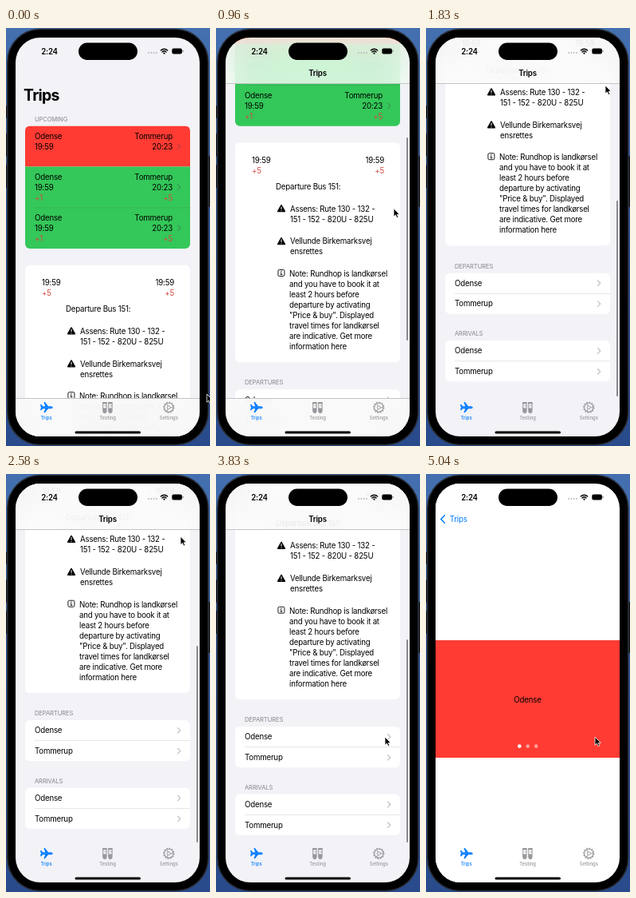
Animation, 256 px wide and 523 px high, one loop 6.73 s. Source, as an HTML page:

```html
<!DOCTYPE html>
<html lang="en">
<head>
<meta charset="utf-8">
<title>Trips</title>
<style>
html, body { margin: 0; width: 100%; height: 100%; overflow: hidden; background: linear-gradient(#4470b0, #2c529b 50%, #294b8b); }
#stage { position: relative; width: 256px; height: 523px; overflow: hidden; }
#stage div, svg { position: absolute; left: 0; top: 0; }
svg { width: 256px; height: 523px; overflow: visible; }
#screen { width: 256px; height: 523px; clip-path: inset(12px 13px 12px 12px round 31px); }
#page, #detail { width: 256px; height: 523px; background: #f2f2f7; }
#detail { background: #fff; }
#stage .bar { width: 256px; background: rgba(250, 250, 250, .82); backdrop-filter: blur(18px) saturate(1.6); box-sizing: border-box; }
#stage #navBar { top: 12px; height: 57.5px; border-bottom: .6px solid #c4c4c6; }
#stage #tabBar { top: 463px; height: 60px; border-top: .6px solid #c4c4c6; background: rgba(249, 249, 249, .93); }
#stage #thumb { left: 239px; width: 2px; border-radius: 1px; background: #8b8b8f; }
#shade { width: 256px; height: 523px; background: #000; }
text { font: 9.7px Inter, "Liberation Sans", sans-serif; letter-spacing: -.2px; white-space: pre; }
.end { text-anchor: end; }
.mid { text-anchor: middle; }
.big { font-size: 19.4px; font-weight: 700; letter-spacing: -.7px; }
.bold { font-weight: 600; }
.head { font-size: 7.6px; letter-spacing: -.12px; fill: #85858b; }
.late { fill: #d24b40; }
.tab { font-size: 5.9px; font-weight: 500; letter-spacing: 0; text-anchor: middle; fill: #97979b; }
.blue { fill: #007aff; }
</style>
</head>
<body>
<div id="stage">
  <svg id="body"></svg>
  <div id="screen">
    <div id="page">
      <svg id="list"></svg>
      <div id="thumb"></div>
      <div id="navBar" class="bar"></div>
      <div id="tabBar" class="bar"></div>
      <div id="shade"></div>
    </div>
    <div id="detail"><svg id="card"></svg></div>
    <svg id="chrome"></svg>
  </div>
  <svg id="cursor"><path d="M0 0V10.2L2.4 8.1L4 11.6L5.8 10.8L4.2 7.4H7.3Z" stroke="#fff" stroke-width=".8"/></svg>
</div>
<script>
const $ = id => document.getElementById(id);
const clamp = v => Math.min(1, Math.max(0, v));

// Drawing helpers
const text = (x, y, s, cls = '') => `<text x="${x}" y="${y}" class="${cls}">${s}</text>`;
const rect = (x, y, w, h, fill, r = 0, more = '') =>
  `<rect x="${x}" y="${y}" width="${w}" height="${h}" rx="${r}" fill="${fill}" ${more}/>`;
const line = (d, color, w, more = '') =>
  `<path d="${d}" fill="none" stroke="${color}" stroke-width="${w}" stroke-linecap="round" stroke-linejoin="round" ${more}/>`;
const dot = (x, y, r, fill) => `<circle cx="${x}" cy="${y}" r="${r}" fill="${fill}"/>`;
const chevron = y => line(`M215.5 ${y - 3.3}l3.3 3.3-3.3 3.3`, 'rgba(60,60,67,.35)', 1.1);
const divider = y => rect(36, y, 195, .5, 'rgba(60,60,67,.25)');

const trip = (y, late) =>
  text(36, y, 'Odense') + text(209, y, 'Tommerup', 'end') +
  text(36, y + 13, '19:59') + text(209, y + 13, '20:23', 'end') + chevron(y + 9.5) +
  (late ? text(36, y + 26, '+1', 'late') + text(209, y + 26, '+5', 'end late') : '');

const section = (y, title, id) =>
  text(36, y, title, 'head') + rect(24, y + 5.8, 207, 51.4, '#fff', 6) +
  rect(24, y + 5.8, 207, 25.5, '#d1d1d6', 6, `id="${id}" opacity="0"`) + divider(y + 31.3) +
  text(36, y + 22.2, 'Odense') + chevron(y + 18.7) +
  text(36, y + 47.9, 'Tommerup') + chevron(y + 44.5);

const lines = (x, y, rows) => rows.map((s, i) => text(x, y + i * 13, s)).join('');

const warning = y =>
  `<path d="M82 ${y - 3.9}L86.2 ${y + 3.6}H77.8Z" stroke="#000" stroke-width="1.8" stroke-linejoin="round"/>` +
  line(`M82 ${y - 1.9}v2.7`, '#fff', 1) + dot(82, y + 2.8, .6, '#fff');

const info = y =>
  rect(77.9, y - 4, 8, 8, 'none', 1.5, 'stroke="#000" stroke-width=".9"') +
  dot(81.9, y - 2, .65, '#000') + line(`M81 ${y - .3}h1v2.3m-1.1 0h2.2`, '#000', .8);

$('list').innerHTML =
  text(22, 90.5, 'Trips', 'big') + text(36, 117, 'UPCOMING', 'head') +
  '<clipPath id="round"><rect x="24" y="122.5" width="207" height="153.5" rx="6"/></clipPath><g clip-path="url(#round)">' +
  rect(24, 122.5, 207, 51, '#ff3b33') + rect(24, 173.5, 207, 103, '#34c759') + '</g>' +
  divider(224.7) + trip(138.6) + trip(189.8, 1) + trip(241, 1) +
  rect(24, 296.5, 207, 275, '#fff', 6) +
  text(45, 322, '19:59') + text(211, 322, '19:59', 'end') +
  text(45, 335.2, '+5', 'late') + text(211, 335.2, '+5', 'end late') +
  text(75, 355, 'Departure Bus 151:') +
  warning(379) + lines(93, 382.8, ['Assens: Rute 130 - 132 -', '151 - 152 - 820U - 825U']) +
  warning(420) + lines(93, 423.6, ['Vellunde Birkemarksvej', 'ensrettes']) +
  info(459.7) + lines(92, 464.2, [
    'Note: Rundhop is landkørsel', 'and you have to book it at', 'least 2 hours before',
    'departure by activating', '"Price &amp; buy". Displayed', 'travel times for landkørsel',
    'are indicative. Get more', 'information here']) +
  section(599.6, 'DEPARTURES', 'tapped') + section(684.3, 'ARRIVALS', 'idle');

$('card').innerHTML =
  rect(12, 208, 231, 147, '#ff3b33') + text(127.5, 285.7, 'Odense', 'mid') +
  dot(117.3, 340.6, 2.3, '#fff') + [127.7, 138.2].map(x => dot(x, 340.6, 2.3, 'rgba(255,255,255,.5)')).join('');

$('body').innerHTML =
  [97, 132, 171].map((y, i) => rect(0, y, 4, i ? 29 : 16, '#15171c', 1)).join('') + rect(252, 160, 4, 64, '#15171c', 1) +
  rect(1.8, 1.5, 252, 520, '#000', 41, 'stroke="#2b2f38" stroke-width="1.6"');

const halfPlane = 'M8.2 0C8.2-1 6.6-1.5 5-1.5H2.4L-1.7-6.6H-3.2L-1.3-1.5H-4.5L-6.3-3.6H-7.6L-6.7 0Z';
const tube = x =>
  rect(x - 3, 468, 6, 2.2, '#97979b', .9) +
  line(`M${x - 2.2} 470v9.6a2.2 2.2 0 0 0 4.4 0v-9.6`, '#97979b', 1) +
  `<path d="M${x - 2} 475.5h4v4a2 2 0 0 1-4 0Z" fill="#97979b"/>` + line(`M${x} 472.6h1.8`, '#97979b', .7);
const spokes = [0, 120, 240].map(a => line('M2 0H5.4', '#97979b', .9, `transform="rotate(${a})"`)).join('');

$('chrome').innerHTML =
  text(54.5, 32.6, '2:24', 'bold mid') + rect(91, 18.5, 74, 21.5, '#000', 10.75) +
  [179, 182.3, 185.6, 188.9].map(x => dot(x, 31, .9, '#b4b4b8')).join('') +
  line('M194.3 28a6 6 0 0 1 8.4 0M196 29.9a3.6 3.6 0 0 1 5 0', '#000', 1.4) + dot(198.5, 31.7, 1.1, '#000') +
  rect(208.3, 25.6, 12.6, 6.8, '#000', 2) + rect(221.6, 27.8, .9, 2.4, '#777', .4) +
  `<g id="title">${text(127.5, 59.7, 'Trips', 'bold mid')}</g>` +
  `<g id="back">${text(29.8, 59.7, 'Trips', 'blue')}</g>` +
  line('M23.4 51.8l-4.7 4.7 4.7 4.7', '#007aff', 1.5, 'id="arrow"') +
  `<g transform="translate(50.6 474.7)" class="blue"><path d="${halfPlane}"/><path d="${halfPlane}" transform="scale(1 -1)"/></g>` +
  tube(123.9) + tube(130.9) +
  `<g transform="translate(204.3 474.8)" fill="none" stroke="#97979b"><circle r="5.6" stroke-width="1.1"/>` +
  `<circle r="6.6" stroke-width="1.2" stroke-dasharray="1.73" /><circle r="2" stroke-width=".9"/>${spokes}</g>` +
  text(50.6, 490.4, 'Trips', 'tab blue') + text(127.5, 490.4, 'Testing', 'tab') + text(204.3, 490.4, 'Settings', 'tab') +
  rect(86.5, 504.6, 82.5, 3, '#000', 1.5);

// Pointer path: time, x, y
const LOOP = 6730, PRESS = 330, RELEASE = 2460, TAP = 4000, END = 289.5;
const path = [
  [0, 252, 458], [40, 252, 458], [PRESS, 228, 379], [960, 223, 226], [1420, 225, 153], [1830, 225, 72],
  [2130, 224, 50], [RELEASE, 224, 50], [2580, 219, 78], [3040, 216, 262], [3290, 216, 262], [3830, 212, 329], [LOOP, 212, 329]];

// Monotone cubic interpolation along the path
const slope = (i, k) => (path[i + 1][k] - path[i][k]) / (path[i + 1][0] - path[i][0]);
function tangent(i, k) {
  if (i < 1 || i > path.length - 2) return 0;
  const a = slope(i - 1, k), b = slope(i, k);
  return a * b > 0 ? 2 * a * b / (a + b) : 0;
}
function pointer(t, k) {
  let i = 0;
  while (i < path.length - 2 && t >= path[i + 1][0]) i++;
  const span = path[i + 1][0] - path[i][0], u = (t - path[i][0]) / span, v = 1 - u;
  return path[i][k] * (1 + 2 * u) * v * v + path[i + 1][k] * u * u * (3 - 2 * u) +
    span * u * v * (tangent(i, k) * v - tangent(i + 1, k) * u);
}

// Drag with rubber band past the end, then spring back
function scrollAt(t) {
  if (t < PRESS) return 0;
  const drag = 379 - pointer(Math.min(t, RELEASE), 2), over = drag - END;
  if (over <= 0) return drag;
  const stretch = 523 * (1 - 1 / (over * .55 / 523 + 1));
  return END + stretch * (t > RELEASE ? Math.exp((RELEASE - t) / 126) : 1);
}

function pushAt(t) {
  if (t < TAP) return 0;
  if (t > 4720) return 1;
  const u = (t - TAP) * .013;
  return 1 - (1 + u) * Math.exp(-u);
}

const move = (id, x, y = 0) => $(id).style.transform = `translate(${x}px, ${y}px)`;
const fade = (id, v) => $(id).style.opacity = v;

function draw(now) {
  const t = now % LOOP, s = scrollAt(t), p = pushAt(t);
  const bar = clamp((s - 20) / 9), top = Math.max(72, 59 + .511 * Math.min(s, END)) + Math.max(0, s - END);

  move('list', 0, -s);
  fade('navBar', bar);
  fade('tabBar', clamp((END - s) / 10));
  fade('thumb', clamp((t - PRESS) / 100));
  $('thumb').style.top = top + 'px';
  $('thumb').style.height = Math.min(254, 461 - top) + 'px';
  fade('tapped', t >= TAP ? 1 : 0);

  move('page', -69 * p);
  fade('shade', .1 * p);
  move('detail', 231 * (1 - p));
  $('detail').style.visibility = p ? 'visible' : 'hidden';
  move('title', -87 * p);
  fade('title', bar * clamp(1 - 1.6 * p));
  move('back', 87 * (1 - p));
  fade('back', clamp(1.6 * p - .6));
  fade('arrow', p);

  move('cursor', pointer(t, 1), pointer(t, 2));
  requestAnimationFrame(draw);
}
requestAnimationFrame(draw);
</script>
</body>
</html>
```
